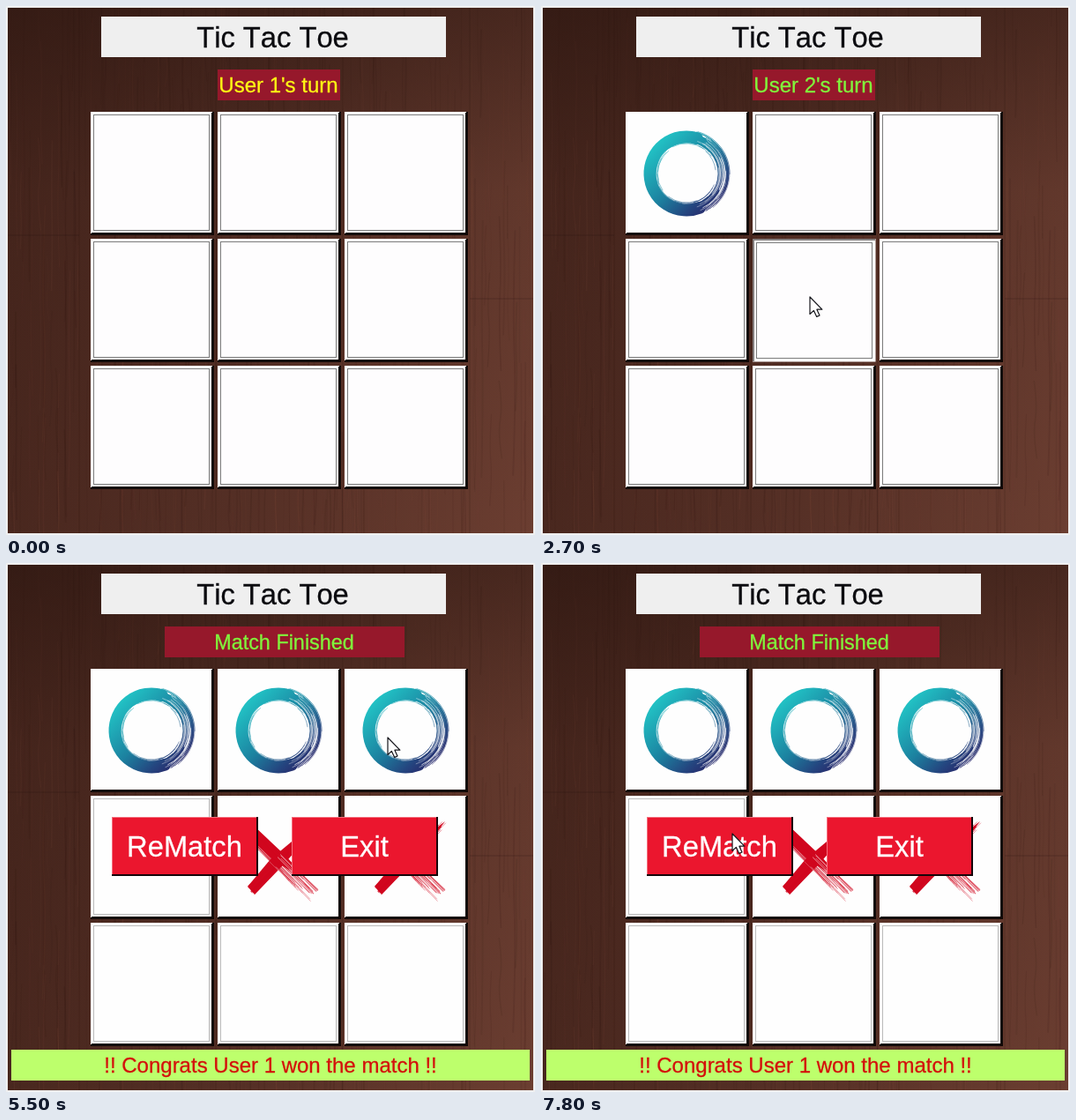
These frames come from a looping animation (600 by 600 pixels, 7900 ms). An HTML page:

```html
<!DOCTYPE html>
<html lang="en">
<head>
<meta charset="utf-8">
<title>Tic Tac Toe</title>
<style>
  html, body { margin: 0; width: 100%; height: 100%; overflow: hidden; background: #efefef; }
  svg { display: block; width: 600px; height: 600px; }
  text {
    font-family: "Liberation Sans", Arial, sans-serif; font-size: 24px; font-kerning: none;
    text-anchor: middle; fill: currentColor; stroke: currentColor; stroke-width: .3px;
  }
  .big { font-size: 32.7px; }
</style>
</head>
<body>
<svg viewBox="0 0 600 600">
  <defs>
    <linearGradient id="wood">
      <stop offset="0" stop-color="#4a281f"/>
      <stop offset=".45" stop-color="#563026"/>
      <stop offset="1" stop-color="#6d3f32"/>
    </linearGradient>
    <linearGradient id="shade" x2="0" y2="1">
      <stop offset="0" stop-color="#1c0c08" stop-opacity=".46"/>
      <stop offset=".35" stop-color="#1c0c08" stop-opacity=".14"/>
      <stop offset="1" stop-color="#1c0c08" stop-opacity=".02"/>
    </linearGradient>
    <linearGradient id="sea" gradientUnits="userSpaceOnUse" x1="32" y1="32" x2="106" y2="108">
      <stop offset="0" stop-color="#22c8c8"/>
      <stop offset=".5" stop-color="#1c82a0"/>
      <stop offset=".8" stop-color="#24457f"/>
      <stop offset="1" stop-color="#2a2468"/>
    </linearGradient>
    <clipPath id="pane"><rect x="2" y="2" width="596" height="596"/></clipPath>

    <g id="base">
      <path fill="#120806" d="M0 0H140V140H0z"/>
      <path fill="#fefefe" d="M0 0H138V1H137V137H1V138H0z"/>
    </g>
    <g id="idle">
      <use href="#base"/>
      <rect x="3.5" y="3.5" width="131" height="131" fill="#fefdfe" stroke="#7b7b7b"/>
    </g>
    <g id="down">
      <path fill="#fff" d="M0 0H139.5V139.5H0z"/>
      <path fill="none" stroke="#858080" stroke-width="2" d="M1 139V1H139"/>
      <rect x="4.5" y="4.5" width="131" height="131" fill="#fefdfe" stroke="#7b7b7b"/>
    </g>
    <g id="off">
      <use href="#base"/>
      <rect x="3.5" y="3.5" width="131" height="131" fill="none" stroke="#777" stroke-dasharray="1 1"/>
    </g>
    <g id="o"><use href="#base"/><g id="ring" fill="none" stroke-linecap="round"/></g>
    <g id="x"><use href="#base"/><g id="cross" fill="none" stroke-linecap="round"/></g>
    <g id="button">
      <path fill="#16060a" d="M0 0H166V67H0z"/>
      <path fill="#f4707e" d="M0 0H164V65H0z"/>
      <path fill="#eb162e" d="M1 1H164V65H1z"/>
    </g>
  </defs>

  <g clip-path="url(#pane)">
    <rect width="600" height="600" fill="url(#wood)"/>
    <g id="grain" fill="none"/>
    <rect width="600" height="600" fill="url(#shade)"/>
  </g>

  <rect x="108" y="12" width="391" height="46" fill="#efefef"/>
  <text class="big" x="302.5" y="46.5" color="#0c0c10">Tic Tac Toe</text>
  <rect id="tag" y="72" height="35" fill="#96182b"/>
  <text id="turn" y="98"></text>
  <g id="board"></g>

  <g id="finish">
    <use href="#button" x="120" y="288"/>
    <text class="big" x="202.5" y="333" color="#fff">ReMatch</text>
    <use href="#button" x="324" y="288"/>
    <text class="big" x="406.5" y="333" color="#fff">Exit</text>
    <rect x="6" y="552" width="588" height="35" fill="#bdff6c"/>
    <text x="300" y="578" color="#d4100c">!! Congrats User 1 won the match !!</text>
  </g>

  <path id="cursor" d="M0 0V19.5L4.4 15.4L7.7 22.4L11 21L7.9 14.2H13.8z"
        fill="#fff" stroke="#16161c" stroke-width="1.2" stroke-linejoin="round"/>
</svg>

<script>
const LOOP = 7900, END = 5400;
const $ = id => document.getElementById(id);

let seed = 11;
const rnd = (a = 0, b = 1) => {
  seed = (seed * 16807) % 2147483647;
  return a + (b - a) * seed / 2147483647;
};

function add(parent, tag, attrs) {
  const el = document.createElementNS("http://www.w3.org/2000/svg", tag);
  for (const k in attrs) el.setAttribute(k, attrs[k]);
  parent.appendChild(el);
  return el;
}

const line = (parent, d, stroke, width, opacity = 1) =>
  add(parent, "path", { d, stroke, "stroke-width": width, "stroke-opacity": opacity });

function drawGrain() {
  const g = $("grain");
  for (let i = 0; i < 420; i++) {
    const x = rnd(0, 600), y = rnd(-150, 560), h = rnd(60, 300), s = rnd(-4, 4);
    line(g, `M${x} ${y}q${s} ${h / 3} ${s / 3} ${h / 2}t${s / 2} ${h / 2}`,
      rnd() < .6 ? "#25100b" : "#8a5140", rnd(.6, 1.8), rnd(.04, .14));
  }
  line(g, "M83 0V600M526 0V600M238 0V600M382 0V600", "#1f0d09", 1, .2);
  line(g, "M0 260H83M526 332H600", "#1f0d09", 1, .25);
}

function arc(r, from, to, cx = 69, cy = 70) {
  const at = a => `${cx + r * Math.cos(a)} ${cy + r * Math.sin(a)}`;
  return `M${at(from)}A${r} ${r} 0 ${to - from > Math.PI ? 1 : 0} 1 ${at(to)}`;
}

function drawRing() {
  const g = $("ring"), sea = "url(#sea)";
  line(g, arc(41.5, 1.2, 5), sea, 14);
  line(g, arc(40.5, -1.4, 1.4), sea, 10.5);
  // dry bristles, mostly on the right side
  for (let i = 0; i < 14; i++)
    line(g, arc(rnd(35, 46), rnd(-1.3, .3), rnd(.4, 1.3)), "#fff", rnd(.4, 1), .75);
  for (let i = 0; i < 12; i++)
    line(g, arc(rnd(45, 49.5), rnd(-1.4, -.7), rnd(-.1, 1.1)), sea, rnd(.5, 1.2), .85);
  for (let i = 0; i < 14; i++) {
    const a = rnd(0, 6.28);
    line(g, arc(rnd(32.5, 35), a, a + rnd(.5, 1.6)), sea, .7, .75);
  }
}

function drawCross() {
  const g = $("cross"), red = "#d1071f";
  add(g, "path", { fill: red, d: "M30 42L40 33L77 68L90 82L84 86L62 72Z" });
  add(g, "path", { fill: red, d: "M34 103L42 112L72 81L90 61L114 29L84 52L60 72Z" });
  for (let i = 0; i < 34; i++) {
    const o = rnd(-7, 7), e = rnd(0, 1);
    line(g, `M${35 + o * .7 - rnd(0, 4)} ${38 - o * .7 - rnd(0, 3)}L${86 + e * 24 + o * .8} ${90 + e * 24 - o}`,
      red, rnd(.5, 1.3), .6);
  }
  for (let i = 0; i < 18; i++) {
    const o = rnd(-6, 6), e = rnd(0, 20);
    line(g, `M${38 + o * .7} ${107 + o * .7 + rnd(-2, 2)}L${94 + e + o * .35} ${50 - e + o * .5}`, red, rnd(.5, 1.2), .7);
  }
  for (let i = 0; i < 16; i++) {
    const s = rnd(60, 90), o = rnd(-7, 7), n = rnd(10, 22);
    line(g, `M${s + 5 + o} ${s + 7 - o}l${n} ${n}`, "#fff", rnd(.4, 1), .6);
  }
}

// cell, mark, press time, release time
const moves = [
  [0, "o", 1800, 2000],
  [4, "x", 2600, 2750],
  [1, "o", 3200, 3350],
  [5, "x", 4400, 4600],
  [2, "o", 5250, END]
];

// time, x, y
const route = [
  [900, 330, 602], [1700, 161, 188], [2050, 161, 188], [2550, 305, 330],
  [2800, 305, 330], [3150, 310, 180], [3650, 310, 180], [4350, 419, 357],
  [4700, 419, 357], [5200, 433, 198], [5600, 433, 198], [6200, 202, 325],
  [6600, 202, 325], [7400, 217, 307], [LOOP, 217, 307]
];

const cells = Array.from({ length: 9 }, (_, i) =>
  add($("board"), "use", { x: 96 + 144 * (i % 3), y: 120 + 144 * Math.floor(i / 3) }));

function cellState(i, t) {
  const move = moves.find(m => m[0] === i);
  if (move && t >= move[3]) return move[1];
  if (move && t >= move[2]) return "down";
  return t >= END ? "off" : "idle";
}

function pointer(t) {
  const k = route.findIndex(p => p[0] > t);
  if (k < 1) return null;
  const [t0, x0, y0] = route[k - 1], [t1, x1, y1] = route[k];
  const p = (t - t0) / (t1 - t0), e = p * p * (3 - 2 * p);
  return [x0 + (x1 - x0) * e, y0 + (y1 - y0) * e].map(Math.round);
}

function render(t) {
  const done = t >= END;
  const user = moves.filter(m => t >= m[3]).length % 2 + 1;
  cells.forEach((c, i) => c.setAttribute("href", "#" + cellState(i, t)));

  $("tag").setAttribute("x", done ? 180 : 240);
  $("tag").setAttribute("width", done ? 272 : 139);
  const turn = $("turn");
  turn.textContent = done ? "Match Finished" : `User ${user}'s turn`;
  turn.setAttribute("x", done ? 315.5 : 309);
  turn.setAttribute("color", done || user === 2 ? "#80f53c" : "#fff714");
  turn.style.fontSize = done ? "23.4px" : "24px";
  $("finish").style.display = done ? "" : "none";

  const at = pointer(t);
  $("cursor").style.display = at ? "" : "none";
  if (at) $("cursor").setAttribute("transform", `translate(${at})`);
}

drawGrain();
drawRing();
drawCross();
render(0);

const start = performance.now();
function tick() {
  render((performance.now() - start) % LOOP);
  requestAnimationFrame(tick);
}
requestAnimationFrame(tick);
</script>
</body>
</html>
```
